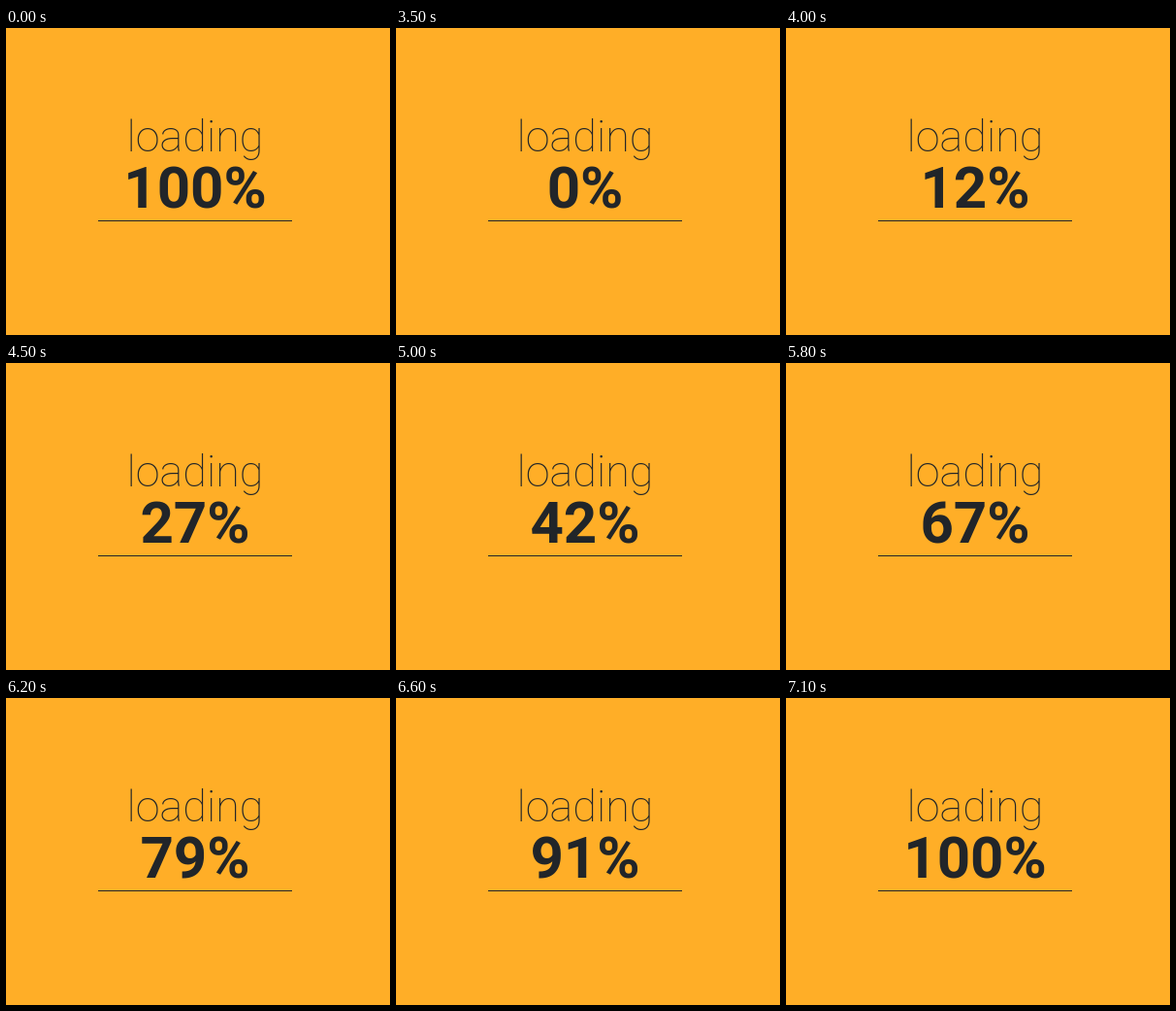
An HTML page for the animation above (7400 ms loop, 396 by 316 pixels).

```html
<!DOCTYPE html>
<html lang="en">
<head>
<meta charset="utf-8">
<title>Loading</title>
<style>
  html, body {
    margin: 0;
    width: 100%;
    height: 100%;
    overflow: hidden;
    background: #ffae27;
  }
  svg {
    display: block;
    width: 396px;
    height: 316px;
  }
  text {
    font-family: Roboto, sans-serif;
    text-anchor: middle;
    fill: #212529;
  }
  .label { font-size: 45px; font-weight: 100; }
  .count { font-size: 60px; font-weight: 700; }
  rect { fill: #212529; }
</style>
</head>
<body>
<svg viewBox="0 0 396 316">
  <text class="label" x="195" y="127">loading</text>
  <text class="count" x="195" y="185">100%</text>
  <rect x="95" y="198" width="200" height="1"/>
</svg>
<script>
  const LOOP = 7400;
  const RESET = 3500;       // full count is held until here
  const COUNT_START = 3584;
  const MS_PER_PERCENT = 33;
  const TICK = 100;         // the display refreshes ten times a second

  const count = document.querySelector('.count');

  function percentAt(time) {
    if (time < RESET) return 100;
    const tick = Math.floor(time / TICK) * TICK;
    const value = Math.floor((tick - COUNT_START) / MS_PER_PERCENT);
    return Math.min(100, Math.max(0, value));
  }

  function render() {
    const label = percentAt(performance.now() % LOOP) + '%';
    if (count.textContent !== label) count.textContent = label;
    requestAnimationFrame(render);
  }

  render();
</script>
</body>
</html>
```
